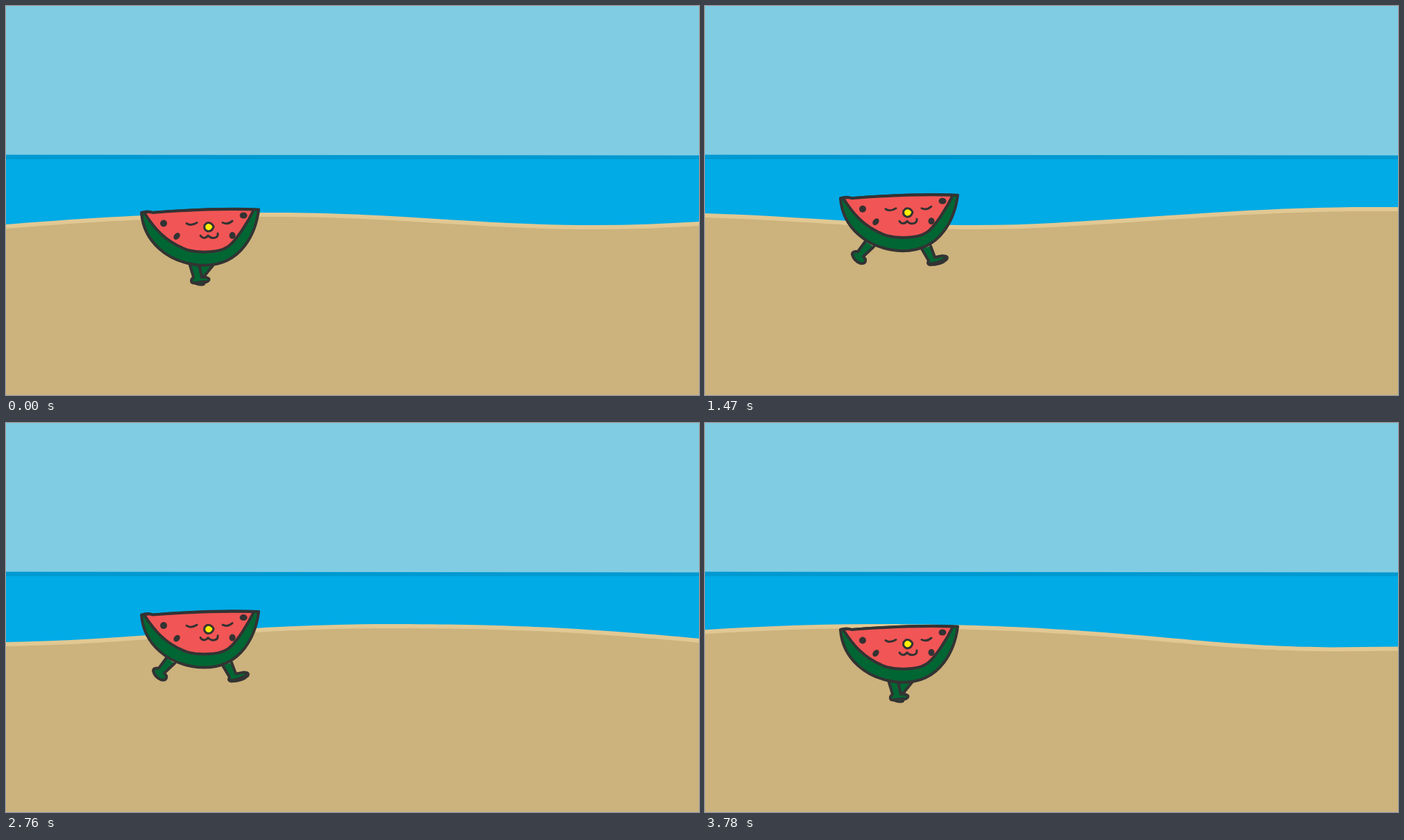
These frames come from a looping animation (998x561 px, 3810 ms). An HTML page without scripts:

```html
<!DOCTYPE html>
<html lang="en">
<head>
<meta charset="utf-8">
<title>Watermelon walk</title>
<style>
  @property --tick { syntax: "<number>"; inherits: true; initial-value: 0; }
  @property --swing { syntax: "<number>"; inherits: true; initial-value: 0; }
  @property --hop { syntax: "<number>"; inherits: true; initial-value: 0; }
  @property --pose { syntax: "<integer>"; inherits: true; initial-value: 0; }

  html, body { margin: 0; width: 100%; height: 100%; overflow: hidden; background: #80cce3; }

  /* one clock of 30 ms ticks drives everything; the small lead avoids rounding at tick edges */
  .stage {
    display: block; width: 998px; height: 561px;
    animation: clock 3.81s -2ms steps(127) infinite;
  }
  @keyframes clock { to { --tick: 127; } }

  .beach { transform: translateX(calc(-9.42px * var(--tick))); }

  /* a bounce lasts 21 ticks: quick off the ground, long in the air */
  .walker {
    --swing: sin(var(--tick) * 180deg / 21);
    --hop: pow(max(var(--swing), -1 * var(--swing)), .4);
    transform: translateY(calc(-22px * var(--hop)));
  }

  /* leg poses lie 160 px apart; the integer type rounds to the nearest one */
  .strip {
    --pose: calc(1.6 * var(--hop) * clamp(-1, 1000 * var(--swing), 1));
    transform: translateX(calc(-160px * var(--pose)));
  }

  .ink { stroke: #333; stroke-width: 4; stroke-linecap: round; stroke-linejoin: round; }
  .thin { stroke-width: 3; fill: none; }
  .rind { fill: #063; }
  .flesh { fill: #f25555; }
  .seeds { fill: #333; }
</style>
</head>
<body>
<svg class="stage" viewBox="0 0 998 561">
  <defs>
    <path id="shore" d="M-20 317L0 315C100 307 220 298 390 298S680 316 850 316 1200 290 1420 290
      C1560 290 1660 294 1780 303.5S1960 322 2087 323.5L2220 322V600H-20Z"/>
  </defs>

  <rect width="998" height="561" fill="#80cce3"/>
  <path d="M0 214.5L998 215.5V340H0Z" fill="#0099d1"/>
  <path d="M0 221H998V340H0Z" fill="#00abe6"/>

  <g class="beach">
    <use href="#shore" fill="#e1c893"/>
    <use href="#shore" y="6" fill="#ccb27c"/>
  </g>

  <g class="walker">
    <svg x="200" width="160" height="561" viewBox="200 0 160 561">
      <g class="strip ink rind">
        <g id="kick" transform="translate(-320)">
          <path d="M260 368L244 372Q240 375 244 386 249 395 256 392 258 388 255 380L276 375"/>
          <path d="M277 375L298 397Q302 401 311 395 316 389 314 385 306 382 302 385L291 372"/>
          <path class="thin" d="M301 394Q304 388 312 387"/>
        </g>
        <g id="passing" transform="translate(-160)">
          <path d="M265 373L252 380Q250 384 255 392 259 400 265 397 268 393 263 385L280 384"/>
          <path d="M277 373L288 394Q290 401 300 399 312 397 312 391 308 387 295 389L289 373"/>
          <path class="thin" d="M292 396Q302 395 310 391"/>
        </g>
        <g id="crossed">
          <path d="M279 375L281 391 286 389 299 373"/>
          <path d="M264 371L270 391Q265 396 268 399L273 400Q279 403 285 401V399Q294 397 292 393 288 390 282 391L278 374Z"/>
          <path class="thin" d="M271 399L286 397"/>
        </g>
        <g id="landing" transform="translate(160 -1)">
          <path d="M243 365L236 383Q228 384 230 390 236 399 250 398 256 395 252 391L245 388 254 371"/>
          <path d="M302 373L308 390Q304 394 307 398 320 401 330 397 336 393 332 390 325 388 317 389L314 371"/>
        </g>
        <g id="wide" transform="translate(320)">
          <path d="M231 360L220 375Q212 374 212 379 214 388 224 392 232 393 231 386L228 382 243 368"/>
          <path d="M312 371L322 388Q319 393 324 394 340 394 348 386 351 381 342 381L331 383 325 367"/>
          <path class="thin" d="M324 392Q336 391 347 384"/>
        </g>
      </g>
    </svg>

    <path class="ink rind" d="M195 298Q204 295 211 298C250 295 315 291 364 293.5C360 325 341 374 285 374C231 372 198 338 195 298Z"/>
    <path class="ink flesh" d="M199 298Q206 296 211 298C250 295 310 292 357 293.5C351 306 332 340 318 348C306 356 278 356 262 352C228 340 212 318 199 298Z"/>

    <g class="seeds">
      <circle cx="227" cy="313.5" r="5"/>
      <ellipse cx="342" cy="302" rx="5.5" ry="4.5"/>
      <ellipse cx="246" cy="332" rx="5.5" ry="4" transform="rotate(-50 246 332)"/>
      <ellipse cx="326" cy="331" rx="4.5" ry="5"/>
    </g>
    <path class="ink thin" d="M260 313.5Q266 318 275 312.5M312 312.5Q319 316 326 310"/>
    <path class="ink thin" d="M280 331C283 336 288 335 291 331C296 337 306 335 305 328"/>
    <path class="ink" style="stroke-width:3" fill="#fff000" d="M289 313Q295 311 299 318 297 325 291 325 284 323 286 316Z"/>
  </g>
</svg>
</body>
</html>
```
